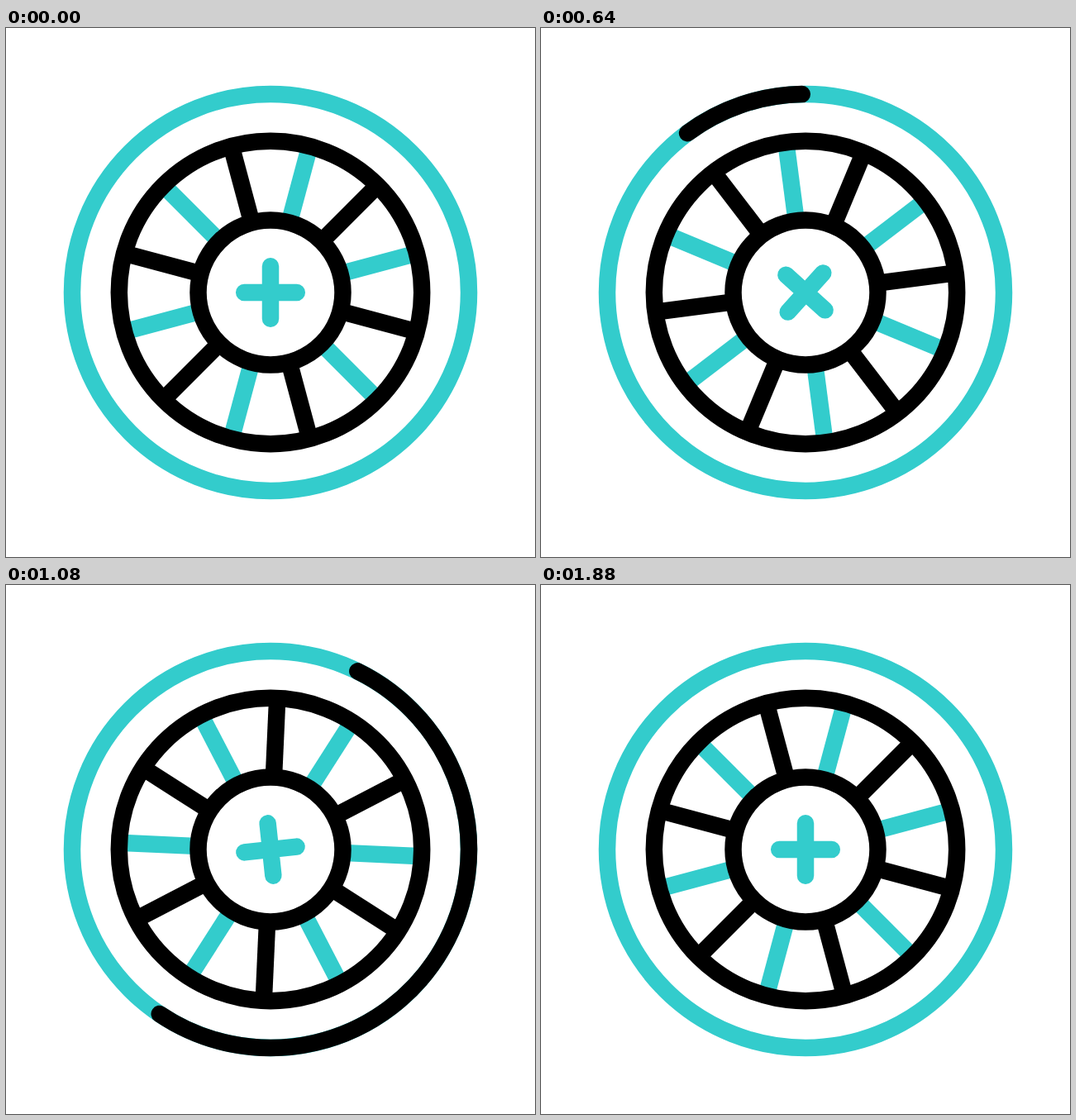
Animation, 640 px wide and 640 px high, one loop 2 s. Source, as an HTML page:

```html
<!DOCTYPE html>
<html lang="en">
<head>
<meta charset="utf-8">
<title>Wheel</title>
<style>
  html, body { margin: 0; width: 100%; height: 100%; overflow: hidden; background: #fff; }
  svg { display: block; width: 100vw; height: 100vh; }
</style>
</head>
<body>
<svg viewBox="-320 -320 640 640" fill="none" stroke="#000" stroke-width="20.5">
  <circle r="240" stroke="#3cc"/>
  <path id="arc" stroke-linecap="round"/>
  <g id="spokes"></g>
  <circle r="183.2"/>
  <circle r="87.5"/>
  <path id="cross" d="M0-31.8V31.8M-31.8 0H31.8" stroke="#3cc" stroke-linecap="round"/>
</svg>
<script>
const LOOP = 2000, STEP = 40, RADIUS = 240, SEAM = 1;
const arc = document.getElementById('arc');
const spokes = document.getElementById('spokes');
const cross = document.getElementById('cross');

for (let i = 0; i < 12; i++) {
  const spoke = document.createElementNS('http://www.w3.org/2000/svg', 'path');
  spoke.setAttribute('d', 'M0-92V-183');
  spoke.setAttribute('transform', `rotate(${i * 30 - 15})`);
  spoke.setAttribute('stroke', i % 2 ? '#3cc' : '#000');
  spokes.append(spoke);
}

// Cubic ease with flat ends; x1 and x2 are the horizontal handles.
function ease(u, x1 = 1 / 3, x2 = 2 / 3) {
  if (u <= 0) return 0;
  if (u >= 1) return 1;
  let lo = 0, hi = 1;
  for (let i = 0; i < 30; i++) {
    const s = (lo + hi) / 2, r = 1 - s;
    if (3 * r * r * s * x1 + 3 * r * s * s * x2 + s * s * s < u) lo = s;
    else hi = s;
  }
  return lo * lo * (3 - 2 * lo);
}

// Each key: time, value, handles of the ease that leads to it.
function track(keys, t) {
  let value = keys[0][1];
  for (let i = 1; i < keys.length; i++) {
    const [t0, v0] = keys[i - 1], [t1, v1, x1, x2] = keys[i];
    value += (v1 - v0) * ease((t - t0) / (t1 - t0), x1, x2);
  }
  return value;
}

const wheelKeys = [[80, 0], [190, -3], [1320, 144, .632, .325], [1880, 120, .72, .2]];
const crossKeys = [[80, 0], [268, -15], [1400, 195, .433, .415], [1880, 180, .83, .17]];
const headKeys = [[320, 0], [1200, 360, .78, .667]];
const tailKeys = [[680, 0], [1600, 360]];

function point(degrees) {
  const a = (degrees + SEAM) * Math.PI / 180;
  return `${(-RADIUS * Math.sin(a)).toFixed(3)} ${(-RADIUS * Math.cos(a)).toFixed(3)}`;
}

function draw(t) {
  spokes.setAttribute('transform', `rotate(${track(wheelKeys, t)})`);
  cross.setAttribute('transform', `rotate(${track(crossKeys, t)})`);
  const head = track(headKeys, t), tail = track(tailKeys, t);
  arc.setAttribute('d', head - tail < 0.01 ? '' :
    `M${point(tail)}A${RADIUS} ${RADIUS} 0 ${head - tail > 180 ? 1 : 0} 0 ${point(head)}`);
}

let start;
function tick(now) {
  start ??= now;
  draw(Math.floor(((now - start) % LOOP + 0.5) / STEP) * STEP);
  requestAnimationFrame(tick);
}
draw(0);
requestAnimationFrame(tick);
</script>
</body>
</html>
```
